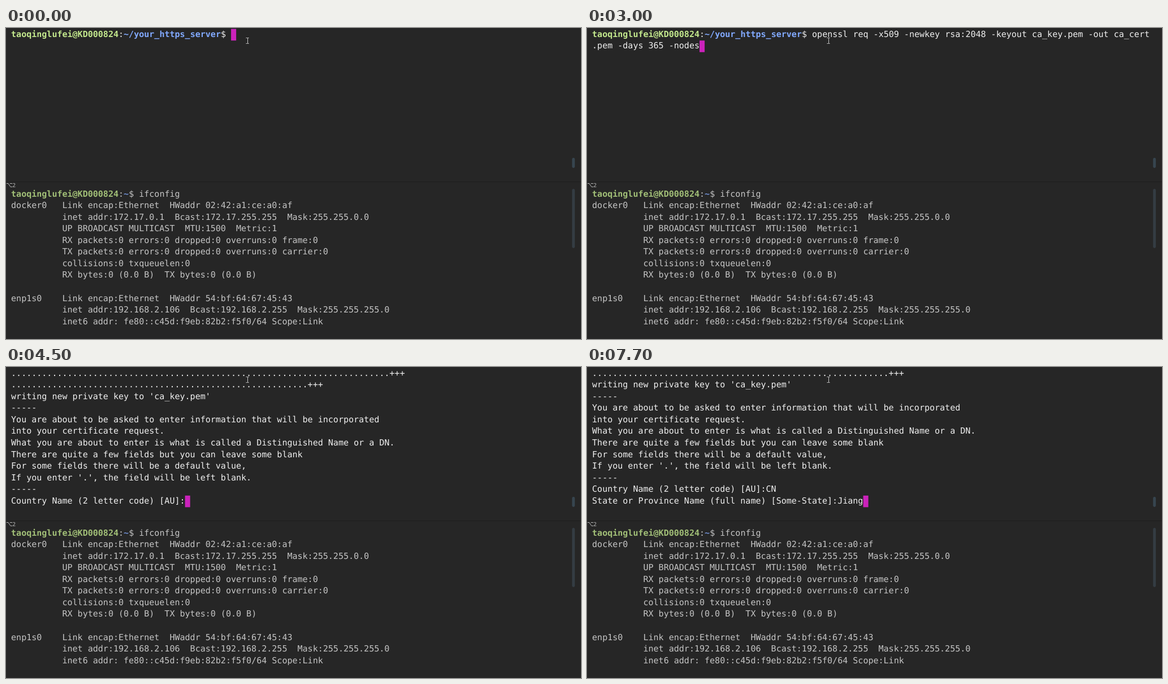
These frames come from a looping animation (1017x551 px, 8000 ms). An HTML page:

```html
<!DOCTYPE html>
<html lang="en">
<head>
<meta charset="utf-8">
<title>Terminal session</title>
<style>
  html, body { margin: 0; width: 100%; height: 100%; overflow: hidden; background: #262626; }
  svg { display: block; width: 100%; height: 100%; }
  text {
    font-family: "DejaVu Sans Mono", monospace;
    font-size: 18.27px;
    white-space: pre;
    text-rendering: geometricPrecision;
    fill: #f0f0f0;
  }
  .user { fill: #c3e88d; font-weight: bold; }
  .path { fill: #82aaff; font-weight: bold; }
  .label { font: 10px "Noto Sans", sans-serif; fill: #b8b8b8; }
</style>
</head>
<body>
<svg viewBox="0 0 1017 551" xmlns="http://www.w3.org/2000/svg">
  <rect width="1017" height="551" fill="#262626"/>
  <rect y="272" width="1017" height="1" fill="#1e1e1e"/>
  <rect x="1001.2" y="230" width="4.9" height="18" rx="2.4" fill="#37454f"/>
  <rect x="1001.2" y="285" width="4.9" height="105" rx="2.4" fill="#343c43"/>
  <path d="M1 275.5h3l4 6h3M7 275.5h4" fill="none" stroke="#b8b8b8"/>
  <text class="label" x="11.2" y="282">2</text>
  <!-- The trace of rotation keeps baselines from snapping to whole pixels -->
  <g id="lower" opacity="0.79" transform="translate(0 282.92) scale(.82245) rotate(.002)"></g>
  <g id="upper" transform="scale(.82245) rotate(.002)"></g>
  <rect id="cursor" width="11" height="25" fill="#cb22bb" transform="scale(.82245)"/>
  <path d="M424.5 17.5h2l.5.5.5-.5h2M427.5 18v9M424.5 27.5h2l.5-.5.5.5h2" fill="none" stroke="#c8c8c8"/>
</svg>
<script>
const LOOP = 8000, ROWS = 12, COLS = 109;
// Character grid, in terminal pixels before scaling
const LEFT = 11, TOP = 2, CELL = 11, LINE = 25, ASCENT = 17;
const USER = "taoqinglufei@KD000824";
const PROMPT = USER + ":~/your_https_server$ ";
const COMMAND = PROMPT + "openssl req -x509 -newkey rsa:2048 -keyout ca_key.pem" +
  " -out ca_cert.pem -days 365 -nodes";
const DOTS = [74, 58];

const INTRO = `writing new private key to 'ca_key.pem'
-----
You are about to be asked to enter information that will be incorporated
into your certificate request.
What you are about to enter is what is called a Distinguished Name or a DN.
There are quite a few fields but you can leave some blank
For some fields there will be a default value,
If you enter '.', the field will be left blank.
-----`.split("\n");

const IFCONFIG = `${USER}:~$ ifconfig
docker0   Link encap:Ethernet  HWaddr 02:42:a1:ce:a0:af
          inet addr:172.17.0.1  Bcast:172.17.255.255  Mask:255.255.0.0
          UP BROADCAST MULTICAST  MTU:1500  Metric:1
          RX packets:0 errors:0 dropped:0 overruns:0 frame:0
          TX packets:0 errors:0 dropped:0 overruns:0 carrier:0
          collisions:0 txqueuelen:0
          RX bytes:0 (0.0 B)  TX bytes:0 (0.0 B)

enp1s0    Link encap:Ethernet  HWaddr 54:bf:64:67:45:43
          inet addr:192.168.2.106  Bcast:192.168.2.255  Mask:255.255.255.0
          inet6 addr: fe80::c45d:f9eb:82b2:f5f0/64 Scope:Link`.split("\n");

const byId = id => document.getElementById(id);
const upper = byId("upper"), cursor = byId("cursor");

// The part of a word typed so far, given the time of each key
const typed = (word, times, t) => word.slice(0, times.filter(k => t >= k).length);

function runs(line) {
  const m = line.match(/^([^ ]+@[^:]+)(:)([^$]+)(\$.*)$/);
  return m ? [[m[1], "user"], [m[2], ""], [m[3], "path"], [m[4], ""]] : [[line, ""]];
}

function drawLines(group, lines) {
  group.replaceChildren();
  lines.forEach((line, row) => {
    let col = 0;
    for (const [str, cls] of runs(line)) {
      const el = document.createElementNS("http://www.w3.org/2000/svg", "text");
      el.setAttribute("x", LEFT + col * CELL);
      el.setAttribute("y", TOP + ASCENT + row * LINE);
      el.setAttribute("class", cls);
      el.textContent = str;
      group.append(el);
      col += str.length;
    }
  });
}

function keyProgress(count) {
  const first = ".".repeat(Math.min(count, DOTS[0]));
  if (count < DOTS[0]) return [first];
  return [first + "+++", ".".repeat(count - DOTS[0])];
}

function screen(t) {
  if (t < 800) return [PROMPT + typed("ls", [400, 500], t)];
  if (t < 2300) return [PROMPT + "ls", "hello-world.bin", PROMPT];
  if (t < 3000) return [PROMPT];

  const lines = [COMMAND.slice(0, COLS), COMMAND.slice(COLS)];
  if (t < 4100) return lines;

  lines.push("Generating a 2048 bit RSA private key");
  if (t < 4500) {
    const step = Math.floor((t - 4000) / 100);
    return lines.concat(keyProgress(Math.round(32.75 * step)));
  }
  lines.push(...DOTS.map(n => ".".repeat(n) + "+++"), ...INTRO);
  lines.push("Country Name (2 letter code) [AU]:" + typed("CN", [5700, 5900], t));
  if (t >= 6200) {
    lines.push("State or Province Name (full name) [Some-State]:" +
      typed("Jiang", [7100, 7300, 7500, 7500, 7700], t));
  }
  return lines.slice(-ROWS);
}

let shown = null;
function render(t) {
  const lines = screen(t), key = lines.join("\n");
  if (key === shown) return;
  shown = key;
  drawLines(upper, lines);
  const row = lines.length - 1;
  cursor.setAttribute("x", LEFT + lines[row].length * CELL);
  cursor.setAttribute("y", TOP + row * LINE);
}

drawLines(byId("lower"), IFCONFIG);
const start = performance.now();
function tick() {
  render((performance.now() - start) % LOOP);
  requestAnimationFrame(tick);
}
tick();
</script>
</body>
</html>
```
